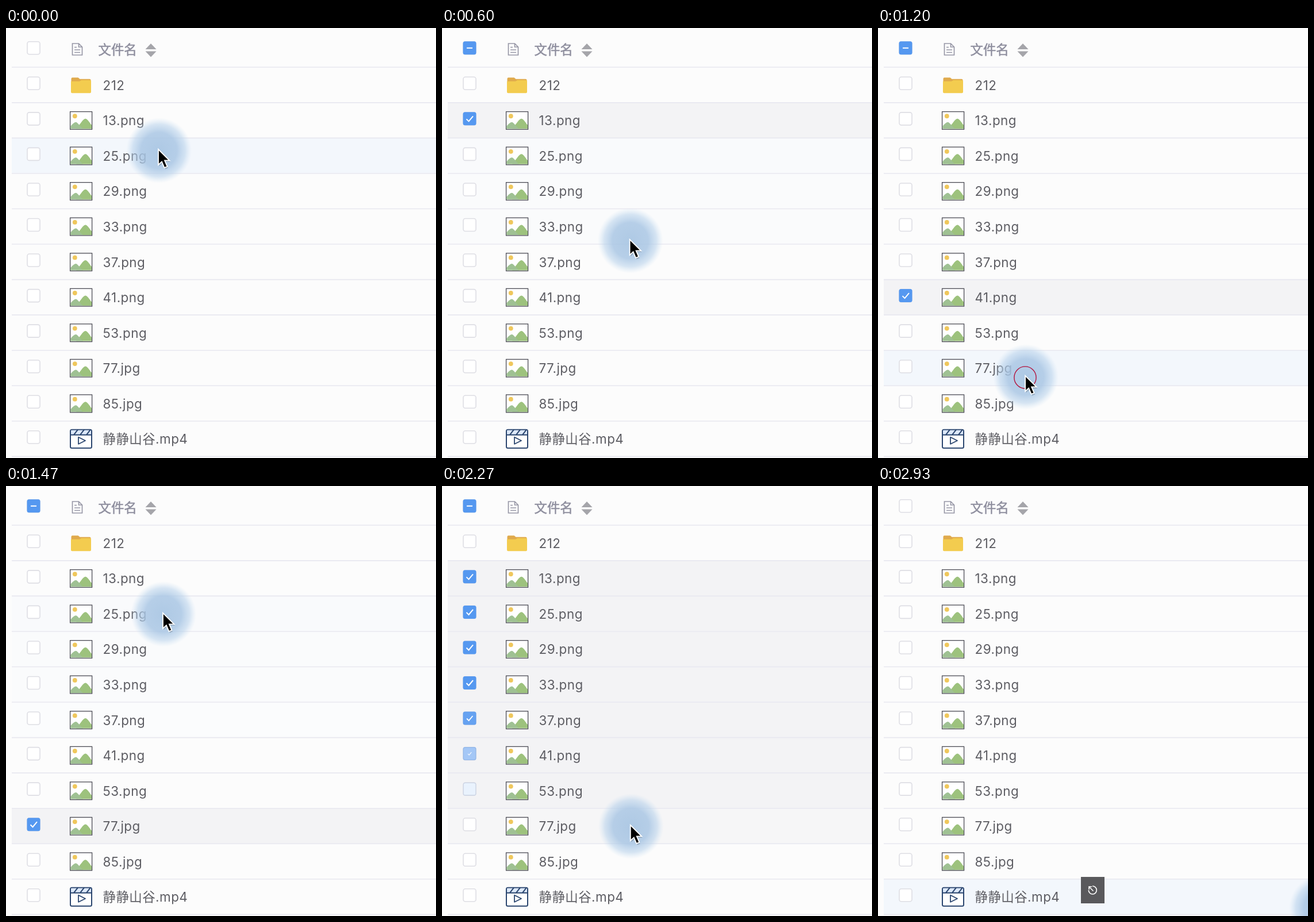
These frames come from a looping animation (748 by 748 pixels, 2990 ms). An HTML page:

```html
<!DOCTYPE html>
<html lang="zh">
<head>
<meta charset="utf-8">
<style>
html, body { margin: 0; width: 100%; height: 100%; overflow: hidden; background: #fcfcfc; }
svg { display: block; width: 100vw; height: 100vh; }
text { font: 22.4px Inter, "Noto Sans CJK SC", "Noto Sans CJK", sans-serif; letter-spacing: .5px; fill: #5d5d63; }
.head { letter-spacing: 0; fill: #8e8e9e; stroke: #8e8e9e; stroke-width: .5px; }
</style>
</head>
<body>
<svg viewBox="0 0 748 748">
  <defs>
    <radialGradient id="glow">
      <stop offset="0" stop-color="#a6c4e2" stop-opacity=".9"/>
      <stop offset=".55" stop-color="#a9c6e4" stop-opacity=".84"/>
      <stop offset=".8" stop-color="#b3cfea" stop-opacity=".52"/>
      <stop offset="1" stop-color="#c8dff2" stop-opacity="0"/>
    </radialGradient>
    <g id="box">
      <rect x="-11" y="-11" width="22" height="22" rx="3.5" fill="#fff" stroke="#dedee4" stroke-width="1.6"/>
    </g>
    <!-- icons are centred on the row -->
    <g id="image">
      <rect x="111.6" y="-15.2" width="38" height="30.8" fill="#fff" stroke="#4c4c55" stroke-width="1.3"/>
      <circle cx="119.8" cy="-7.5" r="3.9" fill="#efc75c"/>
      <path d="M122 14.500C129 7 134-3 138-3S145 4 149 8V14.500Z" fill="#9dc27d"/>
      <path d="M112.300 14.500V10C116 6 119 3 121.500 3S128 9 134 14.500Z" fill="#9fc193"/>
    </g>
    <g id="folder">
      <path d="M113.500-11q0-2 2-2h10l3 2.500h17q2 0 2 2V8h-34Z" fill="#e0aa4c"/>
      <path d="M113-6.500h15l3-2h15q2 0 2 2V12q0 2-2 2H115q-2 0-2-2Z" fill="#f3cc4f"/>
    </g>
    <g id="video" fill="none" stroke="#2b466f" stroke-width="2">
      <rect x="112" y="-16" width="37" height="32" rx="2.500" fill="#fff"/>
      <path d="M113-15h35v8h-35Z" fill="#dce8fa" stroke="none"/>
      <path d="M112-7H149M118-7l7-9M129-7l7-9M140-7l7-9"/>
      <path d="M126-3V9L138 3Z" stroke-width="1.8" stroke-linejoin="round"/>
    </g>
  </defs>
  <g id="rows"></g>
  <path d="M115.500 27H126.500L132.500 33V47H115.500ZM126.500 27V33H132.500M119 33.500h4M119 38h10M119 42.500h10" fill="none" stroke="#9797a6" stroke-width="1.7"/>
  <text class="head" x="160.500" y="46">文件名</text>
  <path d="M242.500 37L252 27L261.500 37ZM242.500 40.500H261.500L252 50.500Z" fill="#a5a5aa"/>
  <circle id="halo" r="57" fill="url(#glow)"/>
  <circle id="ring" fill="none" stroke="#b3123c" stroke-width="1.4"/>
  <g id="key">
    <rect x="353" y="680" width="41" height="46" fill="#59595c"/>
    <path d="M373 696A7 7 0 1 1 366.300 703M374.500 704.500L367.500 697.500M367 702V697H372" fill="none" stroke="#fff" stroke-width="1.6"/>
  </g>
  <g id="cursor">
    <path d="M0 0V27L6 21.500L10.500 32L15.500 30L11 19.500H19.500Z" transform="translate(1.500 2.500)" opacity=".18"/>
    <path d="M0 0V27L6 21.500L10.500 32L15.500 30L11 19.500H19.500Z" stroke="#fff" stroke-width="1.8"/>
  </g>
</svg>
<script>
const LOOP = 2990, PITCH = 61.55, TOP = 68, CLEAR = 2700;
const DRAG = { start: 1978, end: 2293, from: 173, to: 595 };
const names = ['212', '13.png', '25.png', '29.png', '33.png', '37.png', '41.png',
  '53.png', '77.jpg', '85.jpg', '静静山谷.mp4'];
const $ = id => document.getElementById(id);
const clamp = x => Math.max(0, Math.min(1, x));
const sine = u => (1 - Math.cos(Math.PI * clamp(u))) / 2;
const settle = u => { const k = clamp((u - .22) / .42); return k * k * (3 - 2 * k); };

// start, end, destination
const start = [265, 211];
const moves = [
  [0, 260, 300, 165], [428, 713, 340, 470], [850, 1090, 256, 608],
  [1184, 1484, 273, 219], [1640, 1880, 308, DRAG.from],
  [DRAG.start, DRAG.end, 328, DRAG.to], [2400, 2900, 771, 732]];
const presses = [370, 770, 1127, 1530, 1900];

function pointer(t) {
  let [x, y] = start;
  for (const [a, b, tx, ty] of moves) {
    const k = sine((t - a) / (b - a));
    x += (tx - x) * k;
    y += (ty - y) * k;
  }
  return [x, y];
}

// When the drag crosses the upper edge of a row
function crossing(i) {
  const f = clamp((TOP + PITCH * i - DRAG.from) / (DRAG.to - DRAG.from));
  const t = DRAG.start + (DRAG.end - DRAG.start) * Math.acos(1 - 2 * f) / Math.PI;
  return Math.max(2010, t);
}

// Selection spans per row: single clicks first, then the drag over rows 1 to 8
const spans = names.map(() => []);
spans[1].push([430, 830]);
spans[6].push([830, 1212]);
spans[8].push([1212, 1600]);
spans[2].push([1600, CLEAR]);
for (const i of [1, 3, 4, 5, 6, 7, 8]) spans[i].push([crossing(i), CLEAR]);

const level = (list, t, ms, ease) => list.reduce((m, [on, off]) =>
  Math.max(m, ease((t - on) / ms) * (1 - ease((t - off) / ms))), 0);

// Share of the last moments the pointer spent over the row
function hover(i, t) {
  let n = 0;
  for (let s = 0; s < 12; s++) {
    const y = pointer(Math.max(0, t - s * 13))[1];
    if (Math.floor((y - TOP) / PITCH) === i) n++;
  }
  return n / 12;
}

const checkbox = (y, mark) => `<g transform="translate(48 ${y})"><use href="#box"/>
  <g class="on"><rect x="-11.500" y="-11.500" width="23" height="23" rx="3.5" fill="#5598f0"/>
  <path class="mark" d="${mark}" fill="none" stroke="#fff" stroke-width="2"/></g></g>`;
const band = (name, y, fill) =>
  `<rect class="${name}" x="10" y="${y}" width="738" height="${PITCH}" fill="${fill}"/>`;
const line = y => `<path d="M10 ${y + .3}H748" stroke="#e8e8f0" stroke-width="1.600"/>`;

$('rows').innerHTML = names.map((name, i) => {
  const y = TOP + PITCH * i, mid = y + 31.2;
  const icon = i === 0 ? 'folder' : name.endsWith('mp4') ? 'video' : 'image';
  return `<g class="row">${band('hover', y, '#f3f7fc')}${band('sel', y, '#f3f3f5')}
    ${checkbox(y + 28.3, 'M-5.500 .5L-1.500 4.500L6-4.500')}
    <use href="#${icon}" y="${mid}"/><text x="168.500" y="${mid + 8.6}">${name}</text></g>`;
}).join('') + names.map((_, i) => line(TOP + PITCH * i)).join('') +
  line(TOP + PITCH * names.length) + `<g class="all">${checkbox(34.8, 'M-5 0H5')}</g>`;

const rows = [...document.querySelectorAll('.row')];
const all = document.querySelector('.all');

function setCheck(group, k) {
  group.querySelector('.on').setAttribute('opacity', k);
  group.querySelector('.mark').setAttribute('transform', `scale(${k})`);
}

function draw(t) {
  rows.forEach((row, i) => {
    row.querySelector('.hover').setAttribute('opacity', hover(i, t));
    row.querySelector('.sel').setAttribute('opacity', level(spans[i], t, 60, clamp));
    setCheck(row, level(spans[i], t, 250, settle));
  });
  setCheck(all, level([[430, CLEAR]], t, 250, settle));

  const [x, y] = pointer(t);
  $('cursor').setAttribute('transform', `translate(${x} ${y})`);
  $('halo').setAttribute('transform', `translate(${x + 1} ${y + 2})`);

  const press = presses.find(p => t >= p && t < p + 130);
  $('ring').setAttribute('visibility', press === undefined ? 'hidden' : 'visible');
  if (press !== undefined) {
    const [cx, cy] = pointer(press);
    $('ring').setAttribute('transform', `translate(${cx} ${cy})`);
    $('ring').setAttribute('r', 8 + .15 * (t - press));
  }
  $('key').setAttribute('visibility', t >= CLEAR ? 'visible' : 'hidden');
}

const t0 = performance.now();
function tick() {
  draw((performance.now() - t0) % LOOP);
  requestAnimationFrame(tick);
}
tick();
</script>
</body>
</html>
```
